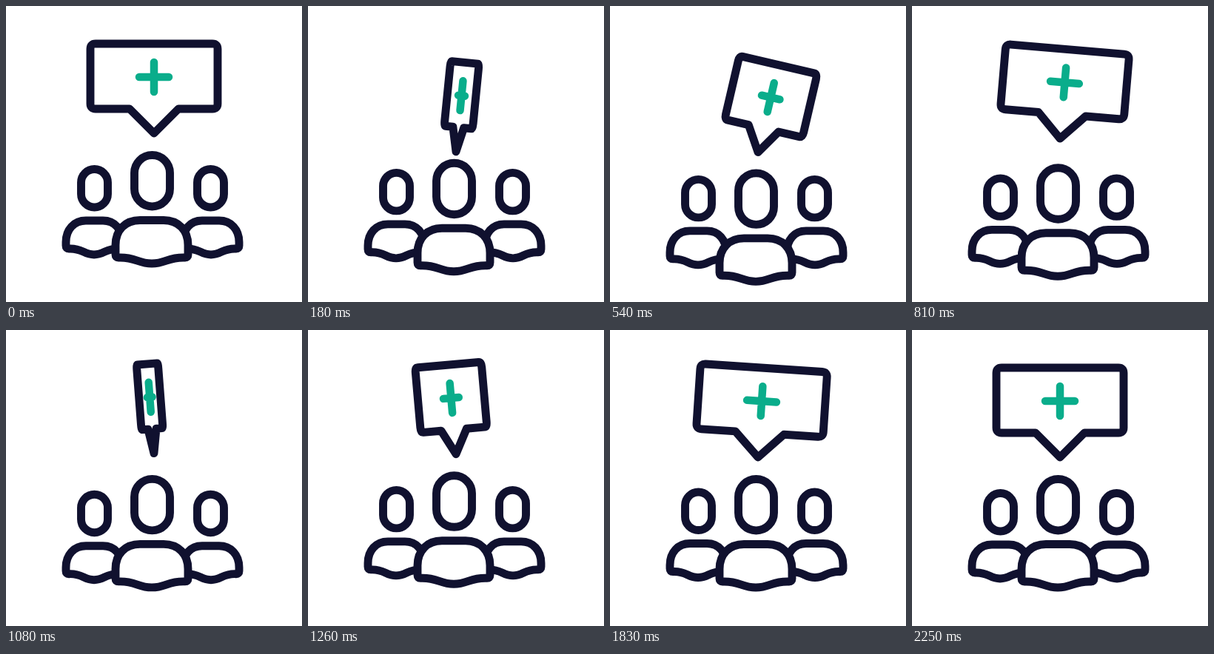
Animation of 400x400 px, one loop 2340 ms. Source, as an HTML page:

```html
<!DOCTYPE html>
<html lang="en">
<head>
<meta charset="utf-8">
<title>Group with speech bubble</title>
<style>
  html, body { margin: 0; width: 100%; height: 100%; overflow: hidden; background: #fff; }
  svg { display: block; width: 100%; height: 100%; }
  path, rect { fill: #fff; stroke: #10112f; stroke-width: 10.9; stroke-linecap: round; stroke-linejoin: round; }
  #bubble path { vector-effect: non-scaling-stroke; }
  #bubble .plus { stroke: #0aad8b; stroke-width: 10.5; }
</style>
</head>
<body>
<svg viewBox="0 0 400 400">
  <defs>
    <g id="person">
      <rect x="101.5" y="220.5" width="36" height="51.5" rx="18"/>
      <path d="M81 324V319C81 302 92 290 108 290H131C147 290 157 302 157 319V324Q157 328 153 328C135 327 133 336 119 336C105 336 103 327 85 328Q81 328 81 324Z"/>
    </g>
  </defs>
  <g id="sides">
    <use href="#person"/>
    <use href="#person" transform="matrix(-1 0 0 1 396 0)"/>
  </g>
  <g id="center">
    <rect x="173.5" y="201.5" width="48" height="69.5" rx="24"/>
    <path d="M148 336V323C148 303 161 289.5 181 289.5H213C233 289.5 246 303 246 323V336Q246 340 242 340C219 339 216 348 197 348C178 348 175 339 152 340Q148 340 148 336Z"/>
  </g>
  <g id="bubble">
    <path d="M-79 -121H79Q86 -121 86 -114V-40Q86 -33 79 -33H33L0 0L-33 -33H-79Q-86 -33 -86 -40V-114Q-86 -121 -79 -121Z"/>
    <path class="plus" d="M0 -96V-56M-20 -76H20"/>
  </g>
</svg>
<script>
  const LOOP = 2340, END = 2250, STEP = 30;

  // Starts at 0 with a kick, then eases from one turning point [ms, value] to the next.
  const swing = (kick, ...turns) => t => {
    let t0 = 0, a = 0, k = kick;
    for (const [t1, b] of turns) {
      if (t < t1) {
        const u = (t - t0) / (t1 - t0), w = 1 - u;
        return a + (b - a) * u * (u * (3 - 2 * u) + k * w * w);
      }
      [t0, a, k] = [t1, b, 0];
    }
    return a;
  };

  const sides = swing(1, [660, 14.8], [1350, -5], [2100, 0]);
  const center = swing(1.5, [600, 24.7], [1240, -4.7], [1800, 0]);
  const lift = swing(2.8, [380, 30], [1100, -5.5], [1640, 0]);
  const tilt = swing(.7, [480, 13.5], [1180, -5.4], [1820, 3.8], [END, 0]);

  // One and a half turns: steady at first, then slowing without a break in speed.
  const TURN = 540, SPEED = .428, BRAKE = 810;
  function spin(t) {
    if (t < BRAKE) return SPEED * t;
    const rest = TURN - SPEED * BRAKE, time = END - BRAKE;
    return TURN - rest * (1 - (t - BRAKE) / time) ** (SPEED * time / rest);
  }

  const move = (id, value) => document.getElementById(id).setAttribute("transform", value);

  function draw(t) {
    const width = Math.max(.01, Math.abs(Math.cos(spin(t) * Math.PI / 180)));
    move("sides", `translate(0 ${sides(t)})`);
    move("center", `translate(0 ${center(t)})`);
    move("bubble", `translate(200 ${172 + lift(t)}) rotate(${tilt(t)}) scale(${width} 1)`);
  }

  const start = performance.now();
  function tick() {
    const t = (performance.now() - start) % LOOP;
    draw(Math.min(END, Math.floor(t / STEP) * STEP));
    requestAnimationFrame(tick);
  }
  tick();
</script>
</body>
</html>
```
